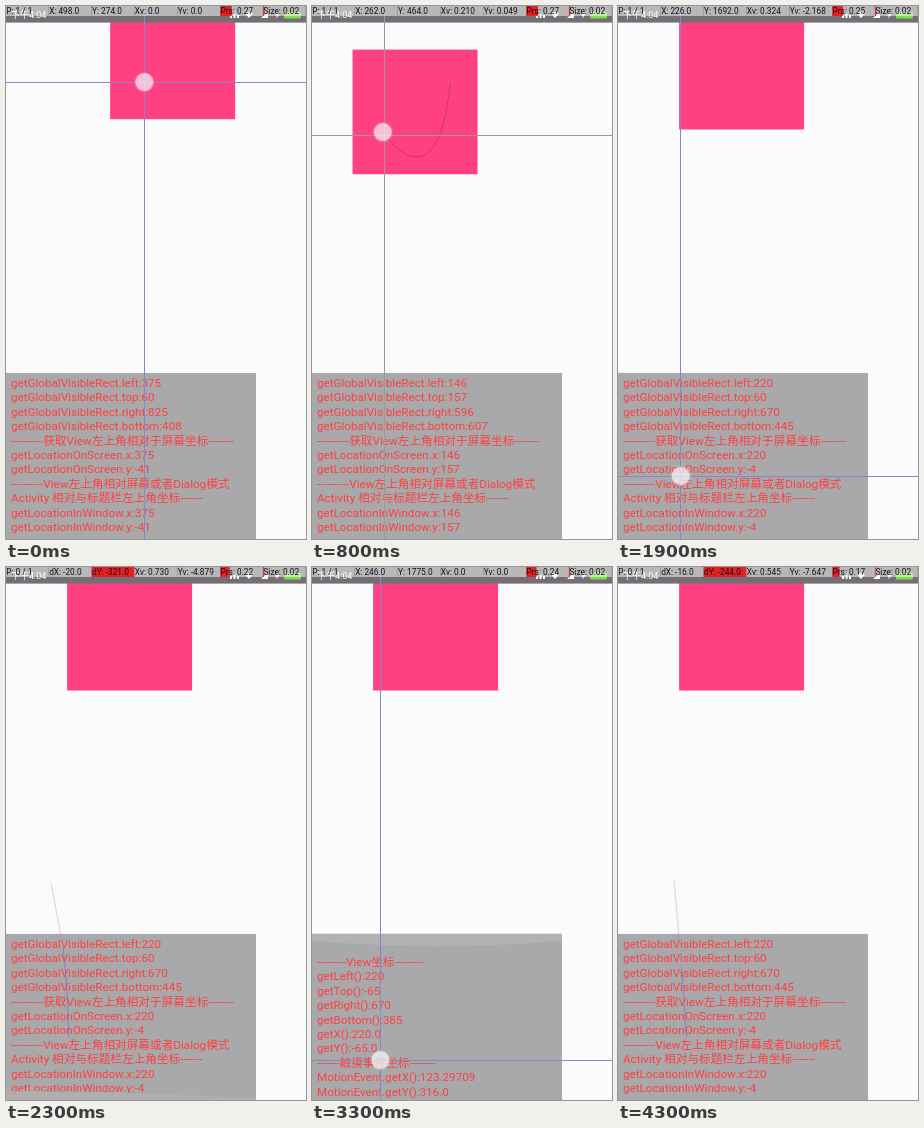
Animation, 300 px wide and 533 px high, one loop 4400 ms. Source, as an HTML page:

```html
<!DOCTYPE html>
<html lang="zh-CN">
<head>
<meta charset="utf-8">
<style>
  html, body { margin: 0; width: 100%; height: 100%; overflow: hidden; background: #fbfafc; }
  svg { display: block; width: 100vw; height: 100vh; }
  text { font-family: Roboto, "Noto Sans CJK SC", "Noto Sans CJK", sans-serif; white-space: pre; }
  #list text { font-size: 11.67px; fill: #ff4040; }
  #labels text { font-size: 8.3px; fill: #111; }
</style>
</head>
<body>
<svg viewBox="0 0 300 533" preserveAspectRatio="none">
  <defs><clipPath id="panelClip"><rect y="366.7" width="250" height="166.3"/></clipPath></defs>
  <rect width="300" height="533" fill="#fbfafc"/>
  <rect id="box" width="125" height="124.6" fill="#ff4081"/>
  <g clip-path="url(#panelClip)">
    <rect y="366.7" width="250" height="167" fill="#a9a8aa"/>
    <g id="list"></g>
    <g fill="#b2b3ae">
      <path id="glowTop" d="M0 366H250V374Q125 384 0 374Z"/>
      <path id="glowBottom" d="M0 534H250V531Q80 523 0 524Z"/>
    </g>
  </g>
  <rect width="300" height="16.6" fill="#756f75"/>
  <g fill="#fff">
    <text x="5" y="12.2" font-size="9">下午4:04</text>
    <path d="M224 9h2v3h-2zM227.500 7h2v5h-2zM231 9h2v3h-2zM239 7.500q4-3 8 0l-4 4.500zM255 12l7-6.500v6.500zM272 5.500l-3 4h2l-1 3 4-4.500h-2.500z"/>
    <rect x="278" y="6" width="17" height="6.500" rx="1.500" fill="#7be04a"/>
  </g>
  <path id="trail" fill="none" stroke-width=".7"/>
  <path id="future" fill="none" stroke="#c58a94" stroke-width=".7" opacity=".6"/>
  <g id="cross">
    <line id="lineH" x2="300"/>
    <line id="lineV" y2="533"/>
  </g>
  <g id="touch" fill="#fff">
    <circle r="10.500" opacity=".12"/>
    <circle r="9" opacity=".62"/>
  </g>
  <g id="labels"></g>
</svg>
<script>
const LOOP = 4400, STEP = 100, SCALE = 300 / 1080, CELL = 300 / 7, LINE = 14.44;
const VIEW_LAG = 40, LABEL_LAG = 21, SLOP = 24;
const $ = id => document.getElementById(id);
const set = (el, attrs) => { for (const k in attrs) el.setAttribute(k, attrs[k]); };
const make = (tag, parent, attrs) => {
  const el = document.createElementNS('http://www.w3.org/2000/svg', tag);
  set(el, attrs);
  return parent.appendChild(el);
};

const ramp = (t, from, to) => Math.min(1, Math.max(0, (t - from) / (to - from)));
const mix = (a, b, u) => a + (b - a) * u;
const linear = u => u;
const easeIn = u => u * u;
const easeOut = u => 1 - (1 - u) ** 2;

// Bézier strokes run in device pixels; "future" is the predicted end on the stage.
const stroke = (start, end, ease, ...points) => ({ start, end, ease, points });
const gestures = [
  { down: 0, up: 1600, color: '#5b3146', velocity: [.21, .049], force: [.27, .33], strokes: [
    stroke(0, 800, linear, [498, 274], [465, 615], [349, 581], [255, 454]),
    stroke(800, 1360, easeOut, [255, 454], [225, 416], [270, 368], [343, 311])] },
  { down: 1800, up: 2250, color: '#6464c8', velocity: [.73, -4.879], force: [.25, .22], future: [45, 316],
    strokes: [stroke(1900, 2200, easeIn, [226, 1692], [222, 1530], [206, 1371])] },
  { down: 2400, up: 2550, color: '#a5878f', velocity: [.775, 3.591], force: [.24, .18], future: [60, 465],
    strokes: [stroke(2420, 2540, linear, [187, 1465], [212, 1587])] },
  { down: 3300, up: 3750, color: '#6464c8', velocity: [.1, -.6], force: [.24, .22],
    strokes: [stroke(3300, 3700, linear, [246, 1775], [246, 1480])] },
  { down: 3900, up: 4150, color: '#6464c8', velocity: [.545, -7.647], force: [.24, .17], future: [56, 313],
    strokes: [stroke(3980, 4120, easeIn, [246, 1692], [230, 1448])] }
];

function bezier(points, u) {
  if (points.length === 1) return points[0];
  const next = points.slice(1).map((b, i) => b.map((v, k) => mix(points[i][k], v, u)));
  return bezier(next, u);
}

function fingerAt({ strokes }, t) {
  const s = strokes.find(s => t < s.end) || strokes[strokes.length - 1];
  return bezier(s.points, s.ease(ramp(t, s.start, s.end)));
}

const scrollAt = t => 278 * (1 - ramp(t, 2420, 2820)) + 82 * ramp(t, 3300, 3700) +
  196 * easeOut(ramp(t, 3980, 4220));

const dash = n => '-'.repeat(n);
function panelLines(x, y) {
  return ['', dash(9) + 'View坐标' + dash(9),
    'getLeft():220', 'getTop():-65', 'getRight():670', 'getBottom():385', 'getX():220.0', 'getY():-65.0',
    dash(7) + '触摸事件坐标' + dash(8),
    'MotionEvent.getX():123.29709', 'MotionEvent.getY():316.0',
    'MotionEvent.getRawX():343.2971', 'MotionEvent.getRawY():311.0',
    dash(8) + '获取View自身可见坐标' + dash(8),
    'getLocalVisibleRect.left:0', 'getLocalVisibleRect.top:65',
    'getLocalVisibleRect.right:450', 'getLocalVisibleRect.bottom:450',
    dash(16),
    'getGlobalVisibleRect.left:' + x, 'getGlobalVisibleRect.top:' + Math.max(60, y),
    'getGlobalVisibleRect.right:' + (x + 450), 'getGlobalVisibleRect.bottom:' + (y + (y < 60 ? 449 : 450)),
    dash(10) + '获取View左上角相对于屏幕坐标' + dash(8),
    'getLocationOnScreen.x:' + x, 'getLocationOnScreen.y:' + y,
    dash(10) + 'View左上角相对屏幕或者Dialog模式',
    'Activity 相对与标题栏左上角坐标' + dash(7),
    'getLocationInWindow.x:' + x, 'getLocationInWindow.y:' + y];
}

const rows = panelLines(0, 0).map((_, i) => make('text', $('list'), { x: 5, y: 384.4 + i * LINE }));
const cells = Array.from({ length: 7 }, (_, i) => {
  const x = i * CELL, box = { x, y: 0, height: 10 };
  make('rect', $('labels'), { ...box, width: CELL - .3, fill: '#fff', opacity: .5 });
  return {
    bar: make('rect', $('labels'), { ...box, fill: '#ec1016', opacity: .9 }),
    text: make('text', $('labels'), { x: x + .3, y: 8 })
  };
});
const setCell = (i, label, fill = 0) => {
  cells[i].text.textContent = label;
  set(cells[i].bar, { width: fill * (CELL - .3) });
};

const toPath = pts => 'M' + pts.map(p => p.map(v => v.toFixed(2)).join(' ')).join('L');
const toStage = p => p.map(v => v * SCALE);

function drawLabels(t, gesture, pressed) {
  const progress = ramp(t, gesture.down, gesture.up);
  const [xv, yv] = gesture.velocity.map(v => v * Math.min(1, 2 * progress));
  const pressure = mix(...gesture.force, progress ** 4);
  const size = pressure / 11;
  const speed = v => v ? v.toFixed(3) : '0.0';
  const at = fingerAt(gesture, t - LABEL_LAG), origin = fingerAt(gesture, gesture.down);
  setCell(0, `P: ${pressed ? 1 : 0} / 1`);
  ['X', 'Y'].forEach((axis, k) => {
    const moved = at[k] - origin[k];
    if (pressed) setCell(k + 1, `${axis}: ${Math.round(at[k]).toFixed(1)}`);
    else setCell(k + 1, `d${axis}: ${Math.round(moved).toFixed(1)}`, Math.abs(moved) > SLOP ? 1 : 0);
  });
  setCell(3, 'Xv: ' + speed(xv));
  setCell(4, 'Yv: ' + speed(yv));
  setCell(5, 'Prs: ' + pressure.toFixed(2), pressure);
  setCell(6, 'Size: ' + size.toFixed(2), size);
}

function drawTouch(t, gesture, pressed) {
  const finger = fingerAt(gesture, t), before = fingerAt(gesture, t - STEP);
  const [x, y] = toStage(finger);
  const visibility = pressed ? 'visible' : 'hidden';
  set($('cross'), { visibility });
  set($('touch'), { visibility, transform: `translate(${x} ${y})` });

  // The crosshair is blue at rest and greys out while it moves.
  const color = k => Math.abs(finger[k] - before[k]) < 5 ? '#8686d0' : '#9c999e';
  const [labelX, labelY] = toStage(fingerAt(gesture, t - LABEL_LAG));
  const cx = Math.floor(labelX) + .5, cy = Math.round(labelY) + .5;
  set($('lineH'), { y1: cy, y2: cy, stroke: color(1) });
  set($('lineV'), { x1: cx, x2: cx, stroke: color(0) });

  const path = [];
  for (let s = gesture.down; s <= Math.min(t, gesture.up); s += 10) path.push(toStage(fingerAt(gesture, s)));
  set($('trail'), { d: toPath(path), stroke: gesture.color, opacity: pressed ? .5 : .8 });
  const showFuture = !pressed && gesture.future;
  set($('future'), { d: showFuture ? toPath([[x, y], gesture.future]) : '' });
}

function draw(t) {
  const gesture = gestures.filter(g => g.down <= t).pop();
  const pressed = t < gesture.up;
  const [fx, fy] = fingerAt(gestures[0], t - VIEW_LAG);
  const x = Math.round(fx) - 123, y = Math.round(fy) - 315;

  set($('box'), { x: x * SCALE, y: y * SCALE });
  panelLines(x, y).forEach((line, i) => { rows[i].textContent = line; });
  set($('list'), { transform: `translate(0 ${-scrollAt(t)})` });
  set($('glowTop'), { opacity: ramp(t, 2750, 2850) - ramp(t, 3300, 3700) });
  set($('glowBottom'), { opacity: ramp(t, 1900, 2200) - ramp(t, 2200, 2600) });
  drawTouch(t, gesture, pressed);
  drawLabels(t, gesture, pressed);
}

const start = performance.now();
function tick() {
  const t = (performance.now() - start) % LOOP;
  draw(Math.floor(t / STEP) * STEP);
  requestAnimationFrame(tick);
}
tick();
</script>
</body>
</html>
```
